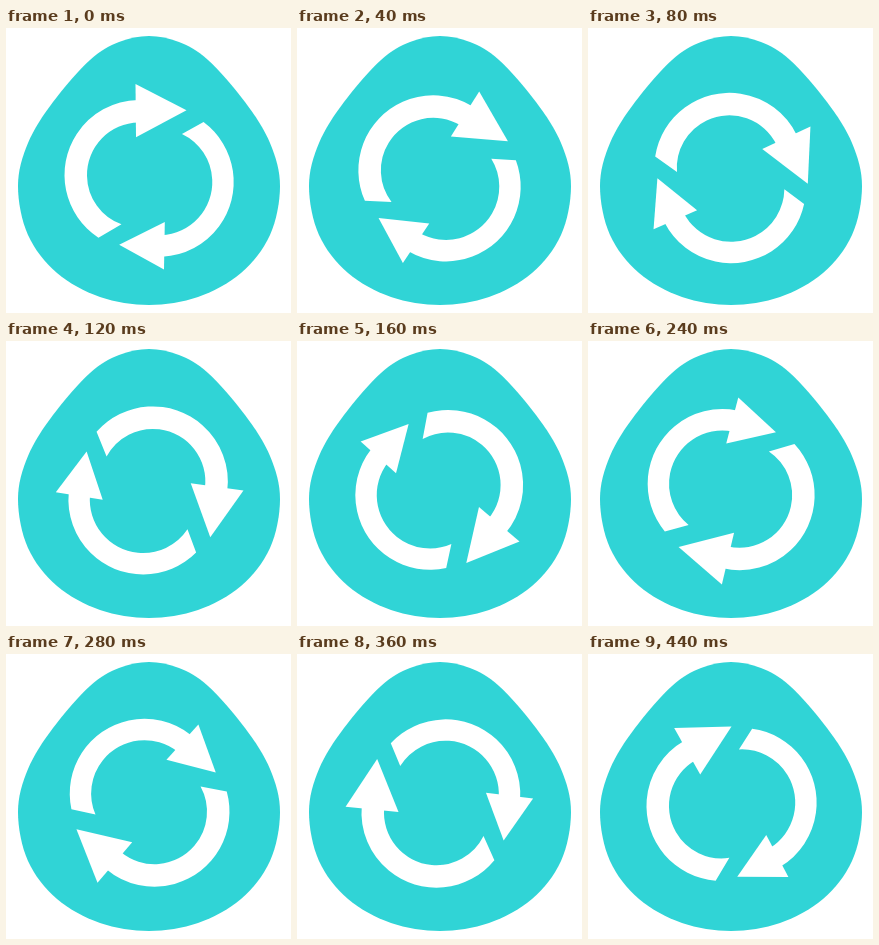
These frames come from a looping animation (285 px wide and 285 px high, 0.48 s). An HTML page with a canvas:

```html
<!DOCTYPE html>
<html lang="en">
<head>
<meta charset="utf-8">
<title>Refresh</title>
<style>
  html, body { margin: 0; width: 100%; height: 100%; overflow: hidden; background: #fff; }
  canvas { display: block; width: 285px; height: 285px; }
</style>
</head>
<body>
<canvas id="stage" width="285" height="285"></canvas>
<script>
const ctx = document.getElementById("stage").getContext("2d");
const STEP_MS = 40;
const STEPS = 12;
const PIVOT = [143, 149.5];

// Right side of the blob from top to bottom; the left side mirrors it.
const rightSide = [
  [173, 14], [202, 32], [239, 74], [264, 115],
  [274, 158], [264, 207], [235, 245], [192, 269]
];
const leftSide = rightSide.map(([x, y]) => [286 - x, y]).reverse();
const blob = smoothLoop([[143, 8], ...rightSide, [143, 277], ...leftSide]);

// Coordinates are relative to the pivot, angles in degrees.
const arrows = [
  {
    center: [-9.5, -2.5], inner: 52.5, outer: 75,
    tailInner: 110.1, tailOuter: 123.2, end: 269,
    head: [[-13.5, -93.5], [37.5, -67.3], [-13, -40.3]]
  },
  {
    center: [10, 4.5], inner: 53.3, outer: 74.7,
    tailInner: -64.5, tailOuter: -53.4, end: 87.5,
    head: [[15, 92], [-29.8, 67.3], [15.8, 44.5]]
  }
];

function radians(degrees) {
  return degrees * Math.PI / 180;
}

function smoothLoop(points) {
  const path = new Path2D();
  const at = i => points[(i + points.length) % points.length];
  path.moveTo(...at(0));
  points.forEach((p, i) => {
    const before = at(i - 1), next = at(i + 1), after = at(i + 2);
    path.bezierCurveTo(
      p[0] + (next[0] - before[0]) / 6, p[1] + (next[1] - before[1]) / 6,
      next[0] - (after[0] - p[0]) / 6, next[1] - (after[1] - p[1]) / 6,
      next[0], next[1]
    );
  });
  path.closePath();
  return path;
}

function drawArrow({ center, inner, outer, tailInner, tailOuter, end, head }) {
  ctx.beginPath();
  ctx.arc(...center, outer, radians(tailOuter), radians(end));
  ctx.arc(...center, inner, radians(end), radians(tailInner), true);
  ctx.closePath();
  ctx.fill();

  ctx.beginPath();
  head.forEach(point => ctx.lineTo(...point));
  ctx.closePath();
  ctx.fill();
}

// The first half turn is slightly quicker than the second.
function turnAt(step) {
  const half = 5.5;
  return step < half ? step * 180 / half : 180 + (step - half) * 27.5;
}

function draw(time) {
  const step = Math.floor(time / STEP_MS) % STEPS;
  ctx.fillStyle = "#fff";
  ctx.fillRect(0, 0, 285, 285);
  ctx.fillStyle = "#30d4d6";
  ctx.fill(blob);

  ctx.save();
  ctx.translate(...PIVOT);
  ctx.rotate(radians(turnAt(step)));
  ctx.fillStyle = "#fff";
  arrows.forEach(drawArrow);
  ctx.restore();
}

const start = performance.now();
function tick() {
  draw(performance.now() - start);
  requestAnimationFrame(tick);
}
tick();
</script>
</body>
</html>
```
